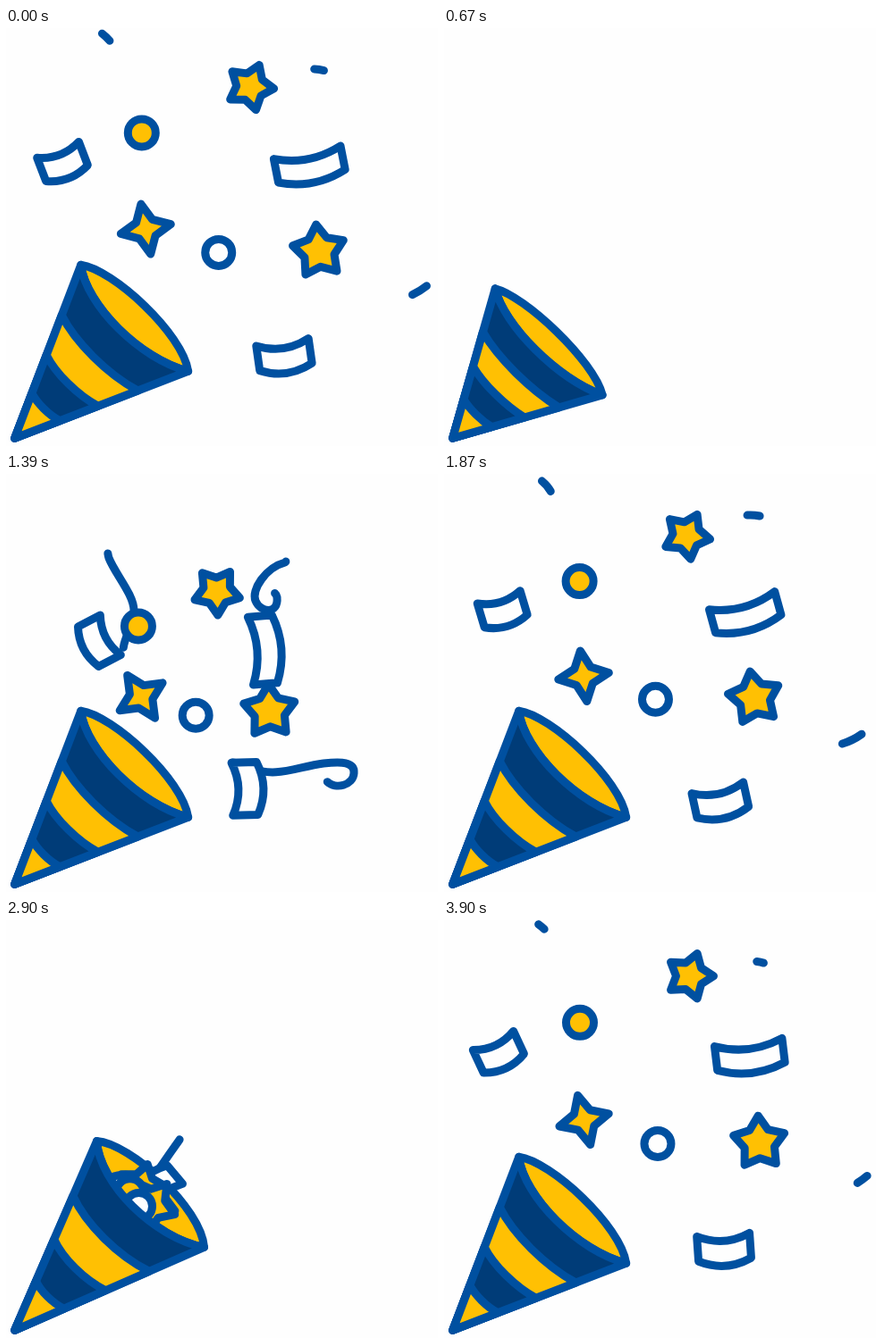
Write an HTML page with a canvas that moves like this. It is 483 px wide and 468 px high and loops after 3.92 s.

```html
<!DOCTYPE html>
<html lang="en">
<head>
<meta charset="utf-8">
<title>Party popper</title>
<style>
html, body { margin: 0; width: 100%; height: 100%; overflow: hidden; background: #fefefe; }
canvas { display: block; }
</style>
</head>
<body>
<canvas id="stage" width="483" height="468"></canvas>
<script>
const ctx = document.getElementById('stage').getContext('2d');
const BLUE = '#0050a0', DARK = '#003c78', GOLD = '#ffc003', PAPER = '#fefefe';
const LOOP = 3920, CYCLE = 1920, RESET = 300;
const FIRE = 945, SETTLE = 2220, REACH = 6.15, LAUNCH = [137, 330];

const bump = (t, peak, width) => Math.exp(-(((t - peak) / width) ** 2));
const mix = (a, b, k) => a + (b - a) * k;

// The cone ducks, then overshoots as it fires
const stretchAt = t => 1 - .2 * bump(t, 690, 170) + .15 * bump(t, 1000, 90);

// Distance still to travel, easing out to zero
const leftAt = t => REACH * ((SETTLE - t) / (SETTLE - FIRE)) ** 2.1;

// Resting place, drift and spin per unit of remaining distance
const parts = [
  { at: [57.4, 144.8], drift: [19.3, 15.9], angle: -32, spin: 38, draw: () => strip(50, 28, 6) },
  { at: [346, 146.8], drift: [-23, 19.5], angle: 0, spin: -38, draw: () => strip(76, 27, 7.5) },
  { at: [316.6, 367.4], drift: [-19.3, -6], angle: 3, spin: -38, draw: () => strip(59, 28, 7) },
  { at: [157, 222], drift: [-2.3, 10.5], angle: -110, spin: 31, draw: () => star(4, 28.5, 13) },
  { at: [278, 57.5], drift: [-16.5, 28.7], angle: -7, spin: 38, draw: () => star(5, 26.5, 15.5) },
  { at: [357, 248], drift: [-24.3, 6.5], angle: -87, spin: -31, draw: () => star(5, 30, 17.5) },
  { at: [152.3, 110.6], drift: [-1.7, 23.2], angle: 0, spin: 0, draw: () => disc(15.5, GOLD) },
  { at: [241, 249], drift: [-11.2, 8.2], angle: 0, spin: 0, draw: () => disc(15, PAPER) }
];

// Flight paths, from the outer end back to the cone, with a speed scale
const streamers = [
  { scale: 33, path: `M103 3C112 9 122 18 122 30C122 45 108 68 115 94C122 112 143 135 143 153
    C143 172 125 190 133 209C140 235 150 280 150 310` },
  { scale: 30, path: `M360 49C350 45 330 44 325 52C312 68 325 85 312 99C290 105 274 130 279 142
    C284 155 305 158 303 138C298 115 250 160 150 310` },
  { scale: 53, path: `M477 283C465 294 450 305 417 307C385 305 350 312 357 342C365 354 388 350 389 335
    C390 322 375 322 355 324C325 328 300 341 275 329C260 321 245 324 232 320C205 318 180 312 150 312` }
].map(s => ({ scale: s.scale, path: new Path2D(s.path) }));

function paint(fill) {
  ctx.fillStyle = fill;
  ctx.fill();
  ctx.stroke();
}

function disc(r, fill) {
  ctx.beginPath();
  ctx.arc(0, 0, r, 0, 2 * Math.PI);
  paint(fill);
}

function star(tips, outer, inner) {
  ctx.beginPath();
  for (let i = 0; i < 2 * tips; i++) {
    const a = i * Math.PI / tips, r = i % 2 ? inner : outer;
    ctx.lineTo(r * Math.cos(a), r * Math.sin(a));
  }
  ctx.closePath();
  paint(GOLD);
}

function strip(w, h, sag) {
  const x = w / 2, y = h / 2;
  ctx.beginPath();
  ctx.moveTo(-x, -y);
  ctx.quadraticCurveTo(0, 2 * sag - y, x, -y);
  ctx.lineTo(x, y);
  ctx.quadraticCurveTo(0, 2 * sag + y, -x, y);
  ctx.closePath();
  paint(PAPER);
}

// Straight drift, bent towards the launch point early in the flight
function drawPart({ at, drift, angle, spin, draw }, left) {
  const bend = (left / REACH) ** 4;
  const [x, y] = at.map((v, i) =>
    v + drift[i] * left + (LAUNCH[i] - v - drift[i] * REACH) * bend);
  ctx.save();
  ctx.translate(x, y);
  ctx.rotate((angle + spin * left) * Math.PI / 180);
  draw();
  ctx.restore();
}

// One dash slides along the path and shortens as it slows
function drawStreamer({ scale, path }, left) {
  const head = scale * (.5 * left + .26 * left ** 2);
  const tail = scale * (.1 + 1.3 * left + .48 * left ** 2);
  ctx.setLineDash([tail - head, 2000]);
  ctx.lineDashOffset = -head;
  ctx.stroke(path);
  ctx.setLineDash([]);
}

// Cone point relative to the tip, stretched along the diagonal, then scaled
function conePoint(stretch, k = 1) {
  return (x, y) => {
    const d = (x - y) / 2 * (stretch - 1);
    return [9.7 + k * (x + d), 459.3 + k * (y - d)];
  };
}

function drawMouth(stretch) {
  const p = conePoint(stretch);
  ctx.beginPath();
  ctx.moveTo(...p(74, -194));
  ctx.bezierCurveTo(...p(110, -189), ...p(188, -117), ...p(194, -75));
  ctx.bezierCurveTo(...p(140, -89), ...p(80, -149), ...p(74, -194));
  paint(GOLD);
}

function drawBody(stretch) {
  [1, .71, .48, .26].forEach((k, i) => {
    const p = conePoint(stretch, k), curve = i ? .55 : 1;
    ctx.beginPath();
    ctx.moveTo(...p(0, 0));
    ctx.lineTo(...p(74, -194));
    ctx.bezierCurveTo(
      ...p(mix(114, 80, curve), mix(-154, -149, curve)),
      ...p(mix(154, 140, curve), mix(-115, -89, curve)),
      ...p(194, -75));
    ctx.closePath();
    paint(i % 2 ? GOLD : DARK);
  });
}

function frame(now) {
  let t = now % LOOP % CYCLE;
  if (t < RESET) t += CYCLE;
  const stretch = stretchAt(t);

  ctx.fillStyle = PAPER;
  ctx.fillRect(0, 0, 483, 468);
  ctx.strokeStyle = BLUE;
  ctx.lineWidth = 9;
  ctx.lineCap = ctx.lineJoin = 'round';

  drawMouth(stretch);
  if (t > FIRE) {
    const left = leftAt(t);
    streamers.forEach(s => drawStreamer(s, left));
    parts.forEach(p => drawPart(p, left));
  }
  drawBody(stretch);
}

const start = performance.now();
function tick() {
  frame(performance.now() - start);
  requestAnimationFrame(tick);
}
tick();
</script>
</body>
</html>
```
